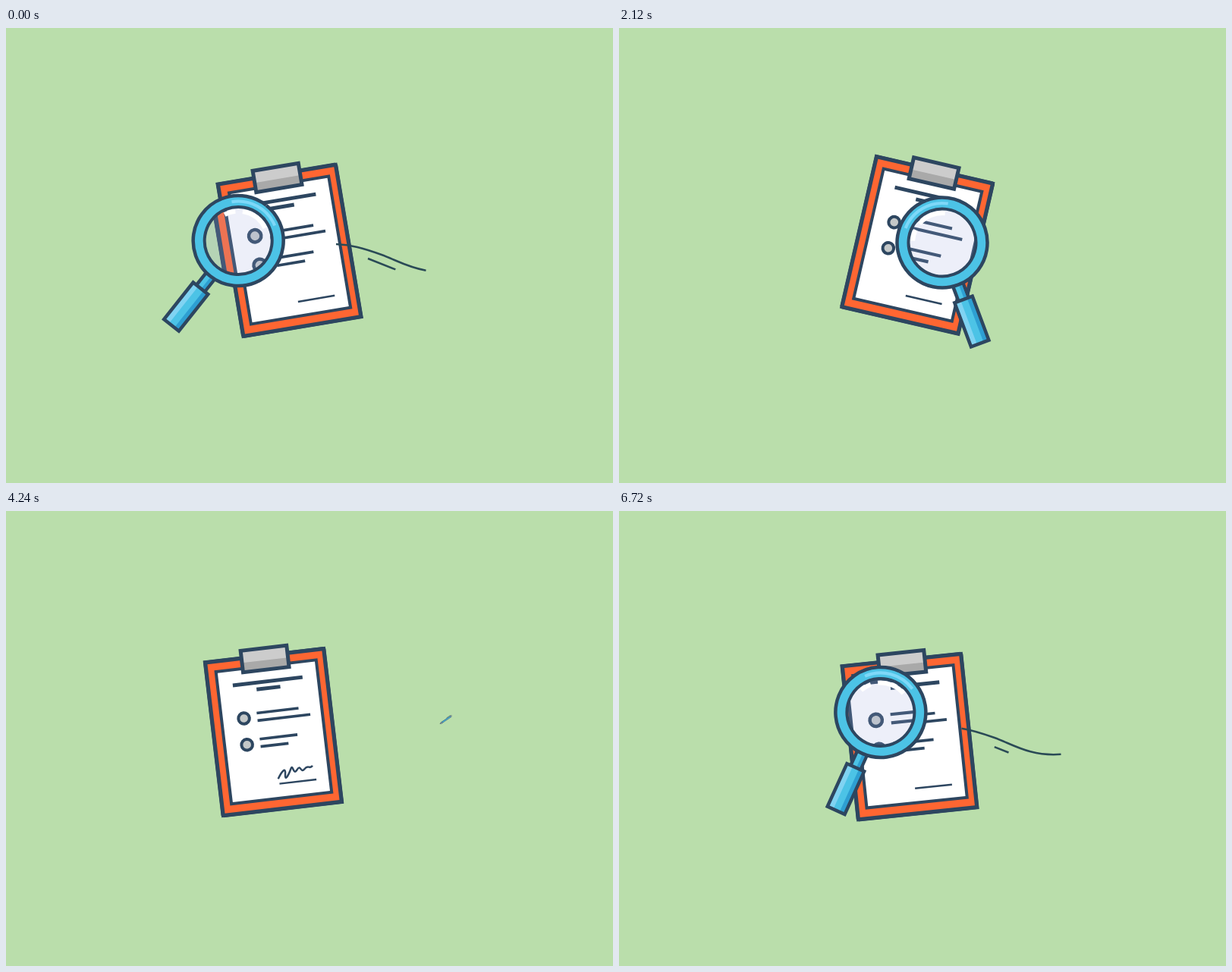
An HTML page that plays this animation: 800x600 px, repeating every 6.76 s.

```html
<!DOCTYPE html>
<html lang="en">
<head>
<meta charset="utf-8">
<title>Clipboard check</title>
<style>
  html, body { margin: 0; width: 100%; height: 100%; overflow: hidden; background: #badeab; }
  svg { display: block; width: 100vw; height: 100vh; }
  .ink { stroke: #2d4660; fill: none; }
  .edge { stroke: #2d4660; stroke-width: 4.5; }
  .trail { stroke: #2a4a56; stroke-width: 2.5; fill: none; }
</style>
</head>
<body>
<svg viewBox="0 0 800 600">
  <defs>
    <clipPath id="lensClip"><circle id="lensHole" r="45"/></clipPath>
  </defs>
  <rect width="800" height="600" fill="#badeab"/>
  <g id="board">
    <g id="art">
      <g class="ink" stroke-width="5.5">
        <path id="outlineA" pathLength="1" d="M-78.5,101.5V-101.5H78.5"/>
        <path id="outlineB" pathLength="1" d="M78.5,-101.5V101.5H-78.5"/>
      </g>
      <rect id="back" class="edge" x="-78.5" y="-101.5" width="157" height="203" fill="#ff6632" style="stroke-width:5"/>
      <rect id="paper" class="edge" x="-66" y="-88" width="133" height="175.5" fill="#fff" style="stroke-width:4"/>
      <g id="bullets" class="edge" fill="#c4c8c8" style="stroke-width:4">
        <circle cx="-36.5" cy="-22.5" r="7.3"/><circle cx="-36.5" cy="12.5" r="7.3"/>
      </g>
      <g id="rows" class="ink"></g>
      <path id="scribble" class="ink" pathLength="1" stroke-width="2.5"
        d="M-1,62c6,-10 12,-15 10,-5s4,2 8,-6s2,10 8,2s4,6 10,0s6,2 11,-3"/>
      <g id="clamp">
        <rect x="-30.5" y="-111.5" width="61" height="28.5" fill="#ccc"/>
        <rect x="-30.5" y="-95.5" width="61" height="12.5" fill="#a9a9a9"/>
        <rect class="edge" x="-30.5" y="-111.5" width="61" height="28.5" fill="none" style="stroke-width:5"/>
      </g>
    </g>
  </g>
  <g id="trails" class="trail"></g>
  <g id="lensView" clip-path="url(#lensClip)">
    <rect width="800" height="600" fill="#badeab"/>
    <use id="zoomed" href="#art"/>
  </g>
  <g id="glass">
    <g id="shine">
      <circle r="45" fill="#a0aadc" opacity=".19"/>
      <g fill="none" stroke="#fff" stroke-width="6">
        <path id="gleamA"/><path id="gleamB"/>
      </g>
    </g>
    <rect class="edge" x="-7" y="58" width="14" height="24" fill="#4cc3e6"/>
    <rect x="1" y="60" width="4" height="19" fill="#2e9fd2"/>
    <rect x="-12.5" y="80" width="25" height="62" fill="#4cc3e6"/>
    <rect x="-12" y="80" width="8" height="62" fill="#80d3f2"/>
    <rect x="5" y="80" width="7" height="62" fill="#2e9fd2"/>
    <rect class="edge" x="-12.5" y="80" width="25" height="62" fill="none"/>
    <circle r="52" fill="none" stroke="#4cc3e6" stroke-width="13"/>
    <path id="rimLight" fill="none" stroke="#7fd8f8" stroke-width="4"/>
    <path id="rimOuter" class="ink" pathLength="1" stroke-width="4.5"/>
    <path id="rimInner" class="ink" pathLength="1" stroke-width="4"/>
  </g>
  <g id="pen">
    <path class="ink" stroke-width="3.5" d="M93,-6V-13H139L142,-6"/>
    <path class="edge" style="stroke-width:4" fill="#c6c9cc" d="M0,0L16,-7H28V7H16Z"/>
    <path class="ink" stroke-width="3.5" d="M16,-7V7"/>
    <path fill="#4fc1ea" d="M28,-6.5H137V6.5H28Z"/>
    <path fill="#2e9fd2" d="M28,-6.5H137V-2H28Z"/>
    <path class="edge" style="stroke-width:4" fill="none" d="M28,-6.5H137V6.5H28Z"/>
    <path class="edge" style="stroke-width:3.5" fill="#c6c9cc" d="M137,-6.5H152L143,6.5H137Z"/>
  </g>
</svg>
<script>
const LOOP = 6760, START = 4720;   // the stage is empty at START; later rounds run past LOOP
const SVG = 'http://www.w3.org/2000/svg';
const $ = id => document.getElementById(id);
const set = (el, attrs) => { for (const k in attrs) el.setAttribute(k, attrs[k]); };
const ramp = (t, from, span) => Math.min(1, Math.max(0, (t - from) / span));
const easeOut = u => 1 - (1 - u) ** 3;

function add(parent, attrs) {
  const el = document.createElementNS(SVG, 'path');
  set(el, { pathLength: 1, ...attrs });
  return parent.appendChild(el);
}

// Damped spring from 0 to 1 with one visible overshoot of about 10 %.
function spring(time, speed) {
  const a = Math.max(0, time) * speed, damping = 0.73;
  return 1 - Math.exp(-damping * a) * (Math.cos(a) + damping * Math.sin(a));
}

// Each move springs from wherever the earlier ones lead; hop lifts the way there.
function follow(rest, moves, t) {
  return moves.reduce((p, { at, speed, hop = 0, ...goal }) => {
    const f = spring(t - at, speed), next = { ...p };
    for (const k in goal) next[k] += (goal[k] - p[k]) * f;
    next.y -= hop * Math.sin(Math.PI * f);
    return next;
  }, rest);
}

// Shows only the part of a path between fractions a and b.
function reveal(el, a, b) {
  set(el, { 'stroke-dasharray': `0 ${a} ${Math.max(0, b - a)} 2`, visibility: b > a ? 'inherit' : 'hidden' });
}
function arc(r, from, to) {
  const at = d => [r * Math.sin(d * Math.PI / 180), -r * Math.cos(d * Math.PI / 180)];
  return `M${at(from)}A${r},${r} 0 ${to - from > 180 ? 1 : 0} 1 ${at(to)}`;
}
const place = ({ x, y, turn }, size = 1) => `translate(${x} ${y}) rotate(${turn}) scale(${size})`;
const shown = size => size > 0.02 ? 'visible' : 'hidden';

const boardRest = { x: 399, y: 305, turn: 0 };
const boardMoves = [
  { at: 6643, speed: .0145, x: 368.5, y: 291, turn: -11.4 },
  { at: 7440, speed: .022, x: 366.5, y: 289.2, turn: -11.24 },
  { at: 7720, speed: .0145, x: 393.2, y: 286.3, turn: 13 },
  { at: 9480, speed: .0145, x: 408.7, y: 291.6, turn: -6.7 },
  { at: 10960, speed: .01, x: -130 }
];
const glassRest = { x: 620, y: 305, turn: -110, size: 0 };
const glassMoves = [
  { at: 5680, speed: .02, x: 503.5, y: 304, turn: -53.5, size: 1 },
  { at: 6100, speed: .015, x: 585, y: 319, turn: -62 },
  { at: 6561, speed: .0113, x: 310, y: 279, turn: 37, hop: 48 },
  { at: 7440, speed: .022, x: 356.5, y: 267.5, turn: -2.2 },
  { at: 7720, speed: .0145, x: 426, y: 283, turn: -20.5 },
  { at: 9400, speed: .012, x: 525, y: 345, size: 0 }
];
const penRest = { x: 511, y: 160, turn: -34.3, size: 0 };
const penMoves = [
  { at: 9880, speed: .015, size: 1 },
  { at: 10250, speed: .03, x: 419.1, y: 351.6 },
  { at: 10880, speed: .015, x: 540, y: 290, size: 0 }
];

const rows = [];
function addRow(x, y, length, width) {
  const at = 5600 + 72 * Math.min(rows.length, 5);
  rows.push({ at, el: add($('rows'), { d: `M${x},${y}h${length}`, 'stroke-width': width }) });
}
addRow(-46, -67.5, 92.5, 5);
addRow(-15.5, -58.5, 31.5, 5);
[[55.5, 70], [50, 37]].forEach((item, i) =>
  item.forEach((length, line) => addRow(-19, -27.5 + 34.5 * i + 10 * line, length, 3.7)));
addRow(0, 68.5, 49, 2.5);

// Speed lines: the head runs out over `span`, the tail starts to follow at `fade`.
const trails = [
  { at: 5880, span: 100, fade: 6010, d: 'M656,250C695,250 727,275 734,310' },
  { at: 5880, span: 100, fade: 6010, d: 'M708,278C717,286 724,297 727,311' },
  { at: 6600, span: 135, fade: 6711, d: 'M590,320C545,326 520,308 495,299S455,286 435,285' },
  { at: 6680, span: 80, fade: 6760, d: 'M513.5,318.5L477,304' },
  { at: 7570, span: 90, fade: 7690, d: 'M225,235C227,255 245,280 270,295' },
  { at: 7570, span: 90, fade: 7690, d: 'M231,232C233,247 240,258 247,267' },
  { at: 10330, span: 90, fade: 10440, d: 'M528.5,141.5L522.5,150.5' },
  { at: 10330, span: 90, fade: 10440, d: 'M502.5,173.5Q497,185 493.5,197.5' }
].map(({ d, ...timing }) => ({ ...timing, el: add($('trails'), { d }) }));

set($('gleamA'), { d: arc(39, -66, -44) });
set($('gleamB'), { d: arc(39, -30, 26) });
set($('rimLight'), { d: arc(52, -48, 29) });
set($('rimOuter'), { d: arc(59.5, 0, 359.9) });
set($('rimInner'), { d: arc(44.5, 0, 359.9) });
const scribbleLength = $('scribble').getTotalLength();
const scribbleStart = $('scribble').getPointAtLength(0);

function drawBoard(t) {
  const p = follow(boardRest, boardMoves, t);
  const landed = Math.max(0, t - 5390);
  p.y += 34 * Math.exp(-landed / 90) * Math.sin(landed / 35);
  set($('board'), { transform: place(p) });
  set($('zoomed'), { transform: place({ ...p, x: p.x - 1, y: p.y - 1 }, 1.12) });

  const outline = easeOut(ramp(t, 4720, 300));
  reveal($('outlineA'), 0, outline);
  reveal($('outlineB'), 0, outline);
  set($('back'), { opacity: ramp(t, 5020, 100) });
  const paper = easeOut(ramp(t, 5100, 160));
  set($('paper'), { transform: `scale(${paper})`, visibility: paper ? 'inherit' : 'hidden' });
  const drop = ramp(t, 5220, 170);
  set($('clamp'), { transform: `translate(0 ${-66 * (1 - drop * drop)})`, opacity: ramp(t, 5200, 60) });
  set($('bullets'), { opacity: ramp(t, 5720, 80) });
  for (const row of rows) reveal(row.el, 0, ramp(t, row.at, 100));
}

function drawGlass(t) {
  const p = follow(glassRest, glassMoves, t), size = Math.max(0, p.size);
  set($('glass'), { transform: place(p, size), visibility: shown(size) });
  set($('lensView'), { visibility: shown(size) });
  set($('lensHole'), { cx: p.x, cy: p.y, r: 45 * size });
  const closing = (id, u) => reveal($(id), .5 - u / 2, .5 + u / 2);
  closing('rimOuter', ramp(t, 5660, 347));
  closing('rimInner', ramp(t, 5680, 348));
  const shine = ramp(t, 6060, 140);
  set($('shine'), { opacity: shine });
  set($('rimLight'), { opacity: shine });
}

function drawPen(t) {
  const written = ramp(t, 10430, 400);
  reveal($('scribble'), 0, written);
  const nib = $('scribble').getPointAtLength(written * scribbleLength);
  const p = follow(penRest, penMoves, t), size = Math.max(0, p.size);
  p.x += nib.x - scribbleStart.x;
  p.y += nib.y - scribbleStart.y - 5 * written;
  set($('pen'), { transform: place(p, size), visibility: shown(size) });
}

function draw(now) {
  const t = START + ((now - START) % LOOP + LOOP) % LOOP;
  drawBoard(t);
  drawGlass(t);
  drawPen(t);
  for (const { el, at, span, fade } of trails) reveal(el, ramp(t, fade, 220), ramp(t, at, span));
}

const began = performance.now();
function tick() {
  draw(performance.now() - began);
  requestAnimationFrame(tick);
}
tick();
</script>
</body>
</html>
```
